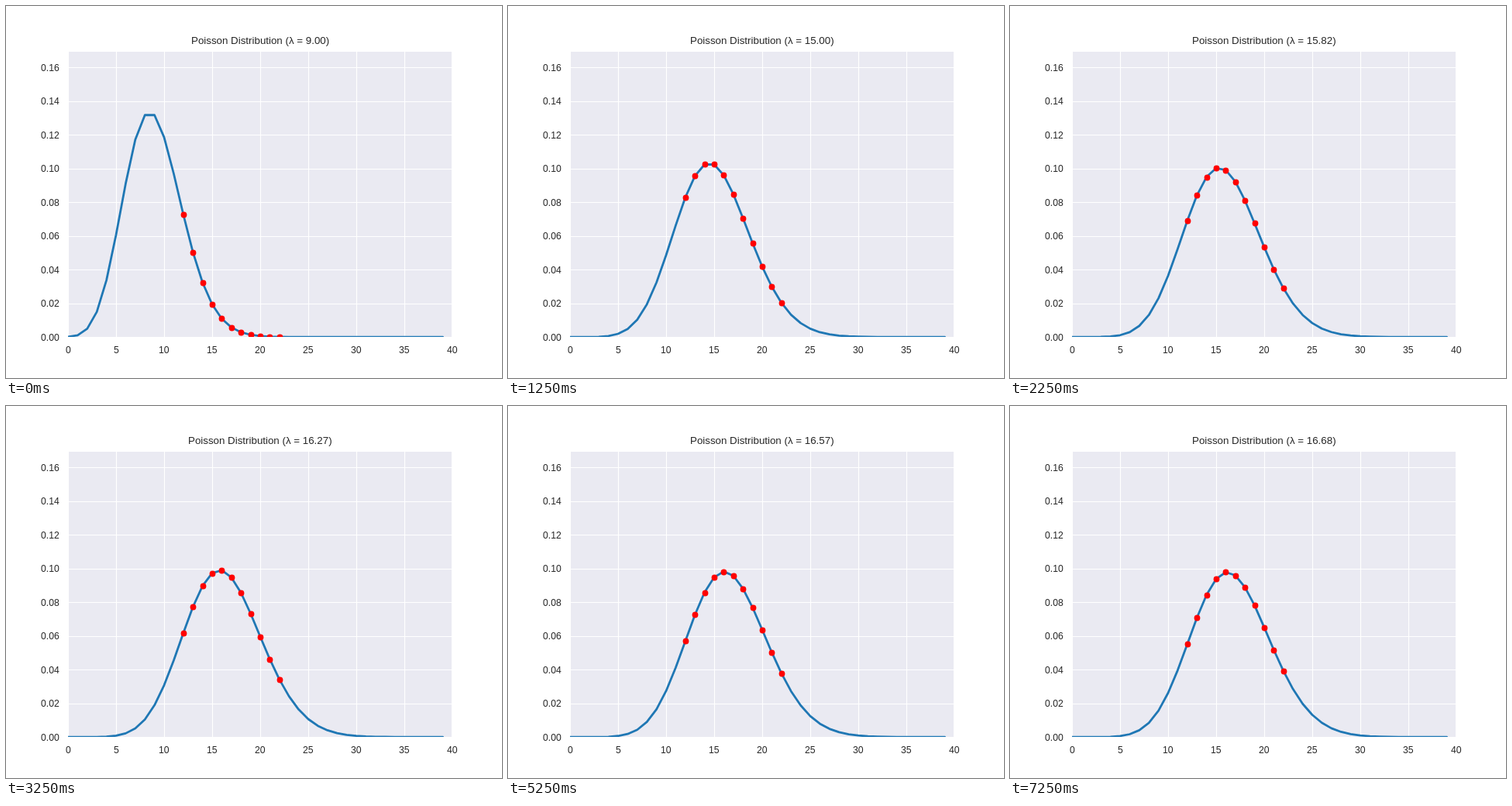
An HTML page with a canvas that plays this animation: 640 by 480 pixels, repeating every 7500 ms.

```html
<!DOCTYPE html>
<html lang="en">
<head>
<meta charset="utf-8">
<title>Poisson Distribution</title>
<style>
  html, body { margin: 0; width: 100%; height: 100%; overflow: hidden; background: #fff; }
  canvas { display: block; }
</style>
</head>
<body>
<canvas id="chart" width="640" height="480"></canvas>
<script>
const ctx = document.getElementById('chart').getContext('2d');
const STEP_MS = 250, STEPS = 30, LIMIT = 17;
const LEFT = 80, RIGHT = 575, TOP = 59, BOTTOM = 427;
const FONT = '"Liberation Sans", Arial, sans-serif';

// [step, lambda]; between them the gap to LIMIT shrinks geometrically.
const KNOTS = [[0, 9], [1, 11.54], [2, 12.89], [5, 15], [9, 15.82],
  [13, 16.27], [17, 16.47], [21, 16.57], [29, 16.68]];

const toX = k => LEFT + k * 12.4;
const toY = p => 427.2 - p * 369.6 / 0.17;
const snap = v => Math.round(v) + 0.5;

function lambdaAt(step) {
  const i = Math.max(1, KNOTS.findIndex(knot => knot[0] >= step));
  const [s0, a] = KNOTS[i - 1], [s1, b] = KNOTS[i];
  return LIMIT - (LIMIT - a) * ((LIMIT - b) / (LIMIT - a)) ** ((step - s0) / (s1 - s0));
}

function poisson(lambda) {
  const p = [Math.exp(-lambda)];
  for (let k = 1; k < 40; k++) p.push(p[k - 1] * lambda / k);
  return p;
}

// Starts on whole pixels; anchor 0.5 centres the text on x, 1 ends it there.
function label(text, x, y, size, anchor) {
  ctx.font = `${size}px ${FONT}`;
  ctx.fillStyle = '#262626';
  const start = x - anchor * ctx.measureText(text).width;
  ctx.fillText(text, Math.round(start), Math.round(y));
}

function line(x0, y0, x1, y1) {
  ctx.beginPath();
  ctx.moveTo(x0, y0);
  ctx.lineTo(x1, y1);
  ctx.stroke();
}

function drawAxes() {
  ctx.fillStyle = '#fff';
  ctx.fillRect(0, 0, 640, 480);
  ctx.fillStyle = '#eaeaf2';
  ctx.fillRect(LEFT, TOP, RIGHT - LEFT, BOTTOM - TOP);
  ctx.strokeStyle = '#fff';
  ctx.lineWidth = 1.11;
  for (let k = 0; k <= 40; k += 5) {
    const x = snap(toX(k));
    line(x, TOP, x, BOTTOM);
    label(k, toX(k), 448, 12.22, 0.5);
  }
  for (let i = 0; i <= 8; i++) {
    const p = i * 0.02, y = snap(toY(p));
    line(LEFT, y, RIGHT, y);
    label(p.toFixed(2), 68.7, toY(p) + 4.4, 12.22, 1);
  }
}

function drawCurve(p) {
  ctx.save();
  ctx.beginPath();
  ctx.rect(LEFT, TOP, RIGHT - LEFT, BOTTOM - TOP);
  ctx.clip();
  ctx.strokeStyle = '#1f77b4';
  ctx.lineWidth = 2.78;
  ctx.lineJoin = ctx.lineCap = 'round';
  ctx.beginPath();
  p.forEach((v, k) => ctx.lineTo(toX(k), toY(v)));
  ctx.stroke();
  ctx.fillStyle = '#f00';
  for (let k = 12; k <= 22; k++) {
    ctx.beginPath();
    ctx.arc(snap(toX(k)), snap(toY(p[k])), 3.9, 0, 2 * Math.PI);
    ctx.fill();
  }
  ctx.restore();
}

let shown = -1;
function render() {
  const step = Math.floor(performance.now() / STEP_MS) % STEPS;
  if (step !== shown) {
    shown = step;
    const lambda = lambdaAt(step);
    drawAxes();
    drawCurve(poisson(lambda));
    label(`Poisson Distribution (λ = ${lambda.toFixed(2)})`, 328, 49, 13.33, 0.5);
  }
  requestAnimationFrame(render);
}
render();
</script>
</body>
</html>
```
